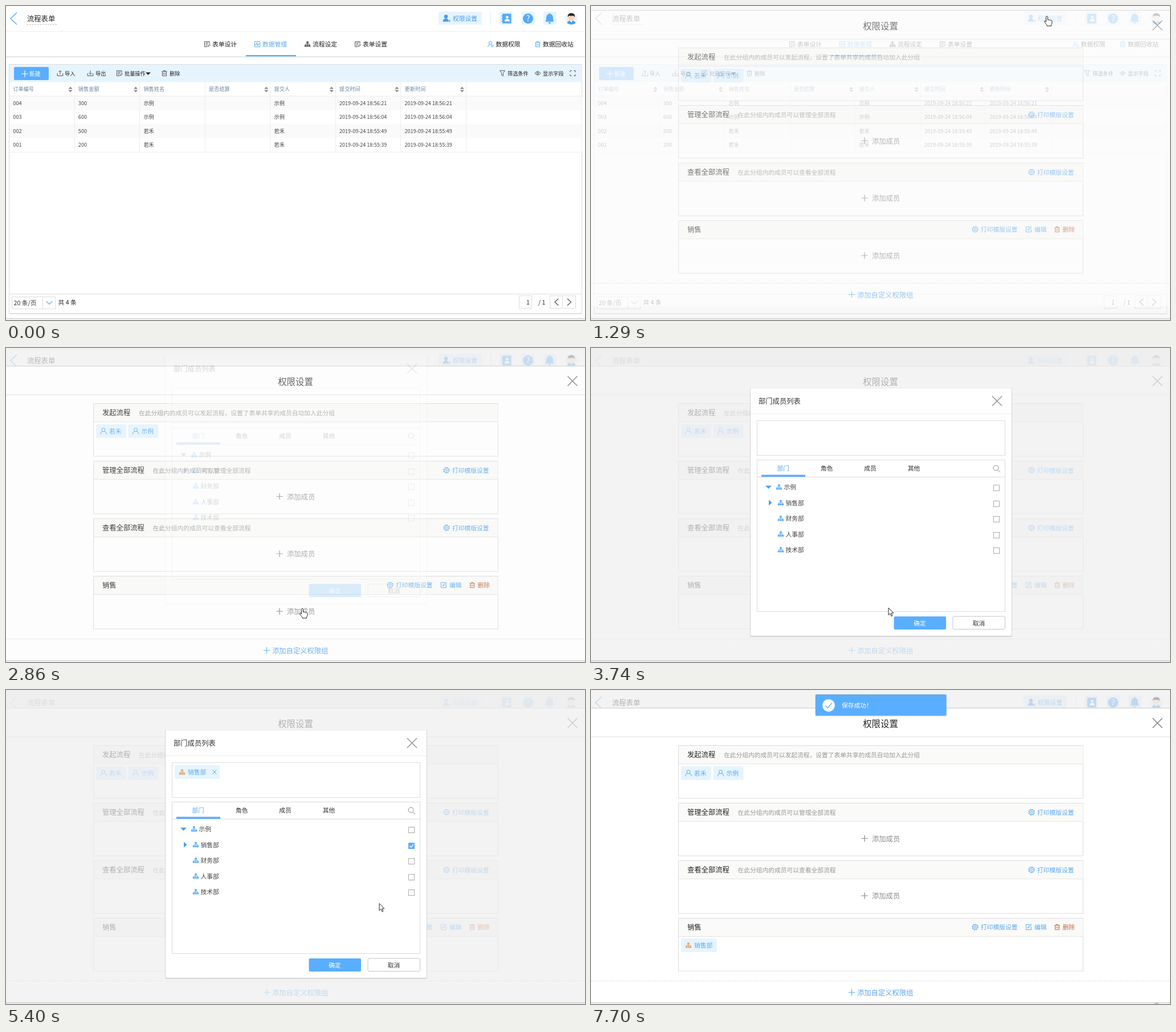
These frames come from a looping animation (1016x551 px, 7.78 s). An HTML page:

```html
<!DOCTYPE html>
<html>
<head>
<meta charset="utf-8">
<title>权限设置</title>
<style>
html, body { margin: 0; width: 100%; height: 100%; overflow: hidden; background: #fff; }
svg { display: block; width: 1016px; height: 551px; font-family: "Noto Sans CJK SC", "Noto Sans CJK", "Noto Sans", sans-serif; }
text { white-space: pre; }
.i { fill: none; stroke: currentColor; stroke-width: 1; }
</style>
</head>
<body>
<svg id="stage" viewBox="0 0 1016 551">
  <defs>
    <g id="user" class="i"><circle cy="-2.4" r="3"/><path d="M-5.4 5.4q.4-4.6 4-5.2M5.4 5.4q-.4-4.6-4-5.2"/></g>
    <g id="key" class="i"><circle cx="-.6" cy="-2" r="2.6"/><path d="M-5 5q.3-4 3.6-4.6"/><circle cx="3" cy="3" r="1.7"/></g>
    <g id="tree" fill="currentColor"><path d="M-1.8-4.8h3.6v3.2h-3.6zM-5.2 1.4h3.2v3h-3.2zM-1.6 1.4h3.2v3h-3.2zM2 1.4h3.2v3H2z"/><path class="i" d="M-3.6 1.6V0H3.6V1.6M0-2V2"/></g>
    <g id="gear" class="i"><circle r="4.1"/><circle r="1.8"/><circle r="5" stroke-dasharray="1.96" stroke-width="1.3"/></g>
    <g id="trash" class="i"><path d="M-4.6-3H4.6M-1.6-3V-4.6H1.6V-3M-3.5-3V4.6H3.5V-3M-1.2-.8V2.6M1.2-.8V2.6"/></g>
    <g id="edit" class="i"><path d="M1.5-4.4H-4.6V4.6H4.4V-.4M-1.6 1.8l.4-1.8L3.6-5l1.4 1.4L.2 1.4z"/></g>
    <g id="form" class="i"><path d="M4-1V-4.5H-4.5V4.5H0M-2.6-2.2H2.2M-2.6 0H1.2M-2.6 2.2H0M1.2 4.2l.3-1.6L4.2 0l1.2 1.2-2.6 2.6z"/></g>
    <g id="chart" class="i"><path d="M-4.6-4.6H4.6V4.6H-4.6zM-4 1h2L-.8-2.6 1 2.6 2.2-.4H4"/></g>
    <g id="in" class="i"><path d="M-4.8 0V4.5H4.8V0M0 2.2V-4.6M-2.6-2L0-4.6 2.6-2"/></g>
    <g id="out" class="i"><path d="M-4.8 0V4.5H4.8V0M0-4.6V2.2M-2.6-.4L0 2.2 2.6-.4"/></g>
    <g id="funnel" class="i"><path d="M-4.4-4.6H4.4L1.4-.4V4.8L-1.4 3.2V-.4z"/></g>
    <g id="eye" class="i"><path d="M-5 0Q0-6.4 5 0Q0 6.4-5 0z"/><circle r="1.6"/></g>
    <g id="full" class="i"><path d="M-4.5-1.8V-4.5H-1.8M1.8-4.5H4.5V-1.8M4.5 1.8V4.5H1.8M-1.8 4.5H-4.5V1.8"/></g>
    <g id="plus" class="i"><path stroke-width="1.2" d="M-5.8 0H5.8M0-5.8V5.8"/></g>
    <g id="cross" class="i"><path stroke-width="1.3" d="M-8.5-8.5L8.5 8.5M8.5-8.5L-8.5 8.5"/></g>
    <g id="sort" fill="#8b7f86"><path d="M-3.6-1L0-4.8 3.6-1zM-3.6 1L0 4.8 3.6 1z"/></g>
  </defs>
</svg>
<script>
const LOOP = 7780;
const BLUE = '#5aaeff', LINK = '#5aa8f5', PALE = '#e6f4ff', LINE = '#dcdcdc', DARK = '#333', GREY = '#999';
const S = 9.2, M = 10.75, L = 12.3;

const text = (x, y, size, str, fill = DARK, anchor = 'start') =>
  `<text x="${x}" y="${y + size * .37}" font-size="${size}" fill="${fill}" text-anchor="${anchor}">${str}</text>`;
const rect = (x, y, w, h, fill, more = '') =>
  `<rect x="${x}" y="${y}" width="${w}" height="${h}" fill="${fill}" ${more}/>`;
const frame = (x, y, w, h, stroke = LINE, more = '') =>
  rect(x + .5, y + .5, w, h, '#fff', `stroke="${stroke}" ${more}`);
const path = (d, stroke, width = 1, more = '') =>
  `<path d="${d}" fill="none" stroke="${stroke}" stroke-width="${width}" ${more}/>`;
const shape = (d, fill) => `<path d="${d}" fill="${fill}"/>`;
const disc = (x, y, r, fill) => `<circle cx="${x}" cy="${y}" r="${r}" fill="${fill}"/>`;
const icon = (id, x, y, color = '#555') => `<use href="#${id}" x="${x}" y="${y}" color="${color}"/>`;
const group = (id, ...parts) => `<g id="${id}">${parts.join('')}</g>`;

function topBar() {
  return path('M19 11.5L8 22L19 32.5', BLUE, 1.5) + text(37, 22, L, '流程表单', '#222')
    + path('M37 32.5H91', '#c8b9b4', 1, 'stroke-dasharray="2.5 2"')
    + rect(759, 10, 76, 23, PALE, 'rx="2"') + disc(772, 18.6, 3.3, '#4a9cea')
    + shape('M766.5 27.5q0-5.5 5.5-5.5q3 0 4 2v3.5z', '#4a9cea') + disc(778, 26, 2, '#7dbcf5')
    + text(784, 22, M, '权限设置', '#4a9cea') + path('M850.5 10V32', '#dcedf8')
    + [866, 904.5, 943].map(x => rect(x, 10, 23, 23, PALE, 'rx="2"')).join('')
    + rect(871, 13.5, 15.5, 17, '#55aaf6', 'rx="1"') + path('M869.5 17.5h3M869.5 22h3M869.5 26.5h3', '#55aaf6', 1.4)
    + disc(879.5, 19.5, 2.3, '#fff') + shape('M875 27q0-4.5 4.5-4.5t4.5 4.5z', '#fff')
    + disc(916, 22, 9, '#55aaf6') + text(916, 21.6, 14, '?', '#fff', 'middle')
    + shape('M946 27.5q2-1.8 2-6.5q0-6 4.8-6.9v-1.4h2.4v1.4q4.8.9 4.8 6.9q0 4.7 2 6.5zM951.5 28.5h5q-.6 2.6-2.5 2.6t-2.5-2.6z', '#55aaf6')
    + disc(992, 22, 11, '#e9f3fa') + shape('M984.5 30q1-4.5 7.5-4.5t7.5 4.5q-7 5-15 0z', '#4b9fe6')
    + shape('M989.5 25.5h5l-2.5 3.5z', '#fff') + disc(992, 20.5, 5.2, '#fbd5b5')
    + shape('M985.8 20q-.6-7.4 6.2-7.4t6.2 7.4q-1.2-2.8-3-3q-4.200.8-7 0q-1.800.8-2.4 3z', '#29262b')
    + path('M0 44.5H1016', '#eee');
}

function tabs() {
  const tab = (id, x, label, color = '#555', ink = '#222') => icon(id, x - 9, 67, color) + text(x, 67, M, label, ink);
  return tab('form', 362, '表单设计') + tab('chart', 450, '数据管理', LINK, LINK)
    + tab('tree', 538, '流程设定') + tab('form', 626, '表单设置')
    + tab('key', 859.5, '数据权限', LINK) + tab('trash', 942, '数据回收站', LINK)
    + group('hover', rect(843, 55, 62, 24, '#ededed', 'rx="2"'), tab('key', 859.5, '数据权限', LINK, LINK))
    + rect(0, 88, 1016, 1, '#dedede') + rect(0, 89, 1016, 2, '#f3f3f3') + rect(421, 86, 88, 2.4, BLUE);
}

function table() {
  const cols = ['订单编号', '销售金额', '销售姓名', '是否结算', '提交人', '提交时间', '更新时间'];
  const rows = [['004', 300, '示例', '56:21'], ['003', 600, '示例', '56:04'], ['002', 500, '若禾', '55:49'], ['001', 200, '若禾', '55:39']];
  const colX = i => 6 + i * 114.55;
  let out = rect(6, 103, 1005, 438, '#e4e4e4', 'rx="2"') + frame(5, 102, 1005, 437) + rect(6, 103, 1004.5, 30.5, PALE)
    + rect(14, 107, 61, 23, BLUE, 'rx="2"') + icon('plus', 33, 119, '#fff') + text(41, 119, 9.8, '新建', '#fff');
  const tools = [['in', 95, 103, '导入'], ['out', 148, 157, '导出'], ['form', 199, 208, '批量操作'], ['trash', 278, 287, '删除'],
    ['funnel', 871, 880, '筛选条件'], ['eye', 933, 942, '显示字段']];
  for (const [id, x, tx, label] of tools) out += icon(id, x, 118) + text(tx, 118.5, S, label, '#222');
  out += shape('M245 116.500h9l-4.500 4.500z', '#222') + icon('full', 994.5, 118);

  rows.forEach((r, i) => {
    const y = 158 + i * 24.4, date = `2019-09-24 18:${r[3]}`;
    out += rect(6, y, 1004.5, 24.4, i % 2 ? '#fff' : '#fafafa') + path(`M6 ${Math.round(y + 24.4) + .5}H1010`, '#ededed');
    [r[0], r[1], r[2], '', r[2], date, date].forEach((v, c) => {
      out += text(colX(c) + 6.3, y + 12.6, c > 4 ? 9 : S, v, '#444');
    });
  });
  cols.forEach((name, c) => {
    out += text(colX(c) + 6.3, 146, S, name, '#6b86a0') + path(`M${Math.round(colX(c + 1)) - .5} 133V255.500`, '#ededed');
    if (c !== 2) out += icon('sort', colX(c + 1) - 7.5, 146.5);
  });
  return out + path('M6 158H1010', '#ededed');
}

function pager() {
  return path('M6 505.500H1010', LINE) + frame(10, 510, 76, 21) + path('M64.500 510V531', LINE)
    + text(13.500, 521, M, '20 条/页') + path('M70.500 518L76 523.500L81.500 518', BLUE, 1.2) + text(91.500, 520, M, '共 4 条', '#222')
    + frame(900, 508, 22, 22) + text(916, 520, M, '1', DARK, 'middle') + text(934, 520, M, '/ 1')
    + frame(954, 508, 45, 22) + path('M976.500 508V531', LINE)
    + path('M969.500 513.500L963 519.500L969.500 525.500M985 513.500L991.500 519.500L985 525.500', '#555', 1.2);
}

const chip = (id, x, y, w, label, color = LINK) =>
  rect(x, y, w, 24, PALE, 'rx="2"') + icon(id, x + 13, y + 12, color) + text(x + 23, y + 12.5, M, label, LINK);

function panel() {
  const box = (y, title, noteX, note = '') => frame(153, y, 710, 92.5) + rect(154, y + 1, 709.5, 32, '#fafaf9')
    + path(`M154 ${y + 32.5}H863`, '#e4e4e4') + text(169, y + 16.500, L, title, '#222') + text(noteX, y + 17, M, note, GREY);
  const print = (x, y) => icon('gear', x, y, LINK) + text(x + 10, y + .5, M, '打印模版设置', LINK);
  const add = y => icon('plus', 480, y, '#888') + text(493, y + .5, L, '添加成员', '#8c8c8c');
  return rect(0, 31, 1016, 1.5, '#d6d6d6') + rect(0, 32.5, 1016, 518.5, '#fff')
    + text(508, 59, 15.4, '权限设置', '#222', 'middle') + icon('cross', 994, 58, '#777') + path('M0 82H1016', LINE)
    + box(97, '发起流程', 233, '在此分组内的成员可以发起流程，设置了表单共享的成员自动加入此分组')
    + chip('user', 158, 134, 53, '若禾') + chip('user', 214.5, 134, 53, '示例')
    + box(198, '管理全部流程', 257.5, '在此分组内的成员可以管理全部流程') + print(773, 214.5) + add(260.5)
    + box(299, '查看全部流程', 257.5, '在此分组内的成员可以查看全部流程') + print(773, 315.5) + add(361)
    + box(400, '销售', 0) + print(674, 416) + icon('edit', 768, 416, LINK) + text(778, 416.5, M, '编辑', LINK)
    + icon('trash', 818, 416, '#c4693c') + text(827.5, 416.5, M, '删除', '#c4693c')
    + group('empty', add(462)) + group('filled', chip('tree', 158, 436, 63, '销售部', '#e8a55c'))
    + path('M0 510.500H1016', LINE, 1, 'stroke-dasharray="2.500 1.500"')
    + icon('plus', 457.500, 530.500, BLUE) + text(467, 531, L, '添加自定义权限组', LINK);
}

function dialog() {
  let out = rect(279, 70, 460, 437, '#000', 'opacity=".12" rx="2"') + rect(280, 70.500, 458, 434.500, '#fff', 'rx="1"')
    + text(294, 93.500, L, '部门成员列表') + icon('cross', 712.500, 93, '#8d8d8d') + path('M280 115.500H738', '#ececec')
    + frame(291, 127, 435, 61) + frame(291, 196, 435, 266) + path('M291 226.500H726', LINE)
    + ['部门', '角色', '成员', '其他'].map((s, i) => text(326.500 + i * 76.400, 211.500, M, s, i ? DARK : LINK)).join('')
    + rect(299, 222.500, 77, 3.500, BLUE) + '<circle cx="710.500" cy="210.500" r="4.500" class="i" color="#888"/>' + path('M714 214L718 218', '#888')
    + group('row', rect(292, 258, 434, 27.500, PALE))
    + shape('M306 241.500h11l-5.500 5.500z', '#4a9fe6') + shape('M312 266.500v10l5.500-5z', '#4a9fe6');
  ['示例', '销售部', '财务部', '人事部', '技术部'].forEach((s, i) => {
    const y = 244 + i * 27.500, x = i ? 333 : 330;
    out += icon('tree', x, y, BLUE) + text(x + 8.500, y + .500, M, s, '#444') + frame(706, Math.round(y - 4), 10, 10, '#aaa');
  });
  const cross = path('M362.500 140.500l7 7M369.500 140.500l-7 7', LINK);
  return out
    + group('picked', rect(706, 268, 11, 11, BLUE), path('M708.500 273.500l2.500 2.500l4-5', '#fff', 1.300), chip('tree', 296, 132, 79, '销售部', '#e8a55c'), cross)
    + rect(531.500, 471, 91.500, 23, BLUE, 'rx="2"') + text(577, 483, M, '确定', '#fff', 'middle')
    + frame(634.500, 470.500, 91.500, 22.500, '#c4c4c4', 'rx="2"') + text(680.500, 483, M, '取消', DARK, 'middle');
}

const veil = id => group(id, rect(0, 0, 1016, 551, '#eee', 'fill-opacity=".7"'));
const toast = rect(393, 7, 231.500, 39.500, '#000', 'opacity=".12" rx="3"') + rect(394, 8, 229.500, 37, BLUE, 'rx="2"')
  + disc(417, 27, 10.800, '#fff') + path('M411.500 27.500l4 4l7-8.500', BLUE, 1.300) + text(440, 27, M, '保存成功！', '#fff');
const arrow = '<path d="M0 0V12.500L2.900 9.800L5 14.600L6.900 13.800L4.900 9.100H8.800Z" fill="#fff" stroke="#222"/>';
const hand = '<path d="M-1.500 10V1.500a1.400 1.400 0 0 1 2.900 0V6.500q1.400-1 2.700.3q1.500-.8 2.600.4q1.600-.5 2.200 1V11.500q0 2.300-1.400 3.600V17H0V15.500Q-2 13-4.600 9.600q-.2-1.800 1.500-1.400z" fill="#fff" stroke="#222"/>';

document.getElementById('stage').innerHTML += topBar() + tabs() + table() + pager()
  + veil('veil1') + group('panel', panel()) + veil('veil2') + group('dialog', dialog()) + group('toast', toast)
  + rect(0, 548, 1016, 1.500, '#cfcfcf') + group('dot', disc(992.500, 554, 5, '#f3a648'))
  + group('cursor', group('arrow', arrow), group('hand', hand));

// Keys are [ms, declarations, easing]; values hold unless an easing is given.
const sheet = document.head.appendChild(document.createElement('style'));
let css = '';
function anim(id, keys) {
  const rows = [...keys, [LOOP, keys[keys.length - 1][1]]];
  css += `#${id}{animation:${id} ${LOOP}ms infinite}@keyframes ${id}{`
    + rows.map(([t, decl, ease = 'step-end']) => `${t / LOOP * 100}%{${decl};animation-timing-function:${ease}}`).join('') + '}';
}
const hops = n => `steps(${n - 1},jump-both)`;
const show = on => `opacity:${on ? 1 : 0}`;
const toggle = (id, start, ...times) => anim(id, [[0, show(start)], ...times.map((t, i) => [t, show(i % 2 ? start : !start)])]);
const at = (x, y) => `transform:translate(${x}px,${y}px)`;
const lift = (on, y) => `${show(on)};${at(0, y)}`;

toggle('hover', 0, 810, 880);
anim('veil1', [[0, show(0)], [1110, show(0), hops(5)], [1430, show(1)]]);
anim('panel', [[0, lift(0, -60)], [1110, lift(0, -60), hops(5)], [1430, lift(1, 0)]]);
anim('veil2', [[0, show(0)], [2860, show(0), hops(5)], [3180, show(1)], [5880, show(1), hops(4)], [6126, show(0)]]);
anim('dialog', [[0, lift(0, -71)], [2860, lift(0, -71), hops(5)], [3180, lift(1, 0)], [5880, lift(1, 0), hops(6)], [6290, lift(0, -71)]]);
anim('toast', [[0, show(0)], [6290, show(0), hops(3)], [6450, show(1)]]);
toggle('picked', 0, 4850);
toggle('filled', 0, 5880);
toggle('empty', 1, 5880);
toggle('dot', 0, 7700);

const row = i => lift(1, i * 27.500);
anim('row', [[0, lift(0, 0)], [4214, row(3)], [4372, row(2)], [4530, row(1)], [4690, row(0)],
  [5010, row(1)], [5089, row(2)], [5247, row(3)], [5326, lift(0, 0)]]);

const handTimes = [810, 880, 960, 1430, 2460, 2940, 4214, 5326, 5720, 5960];
toggle('hand', 0, ...handTimes);
toggle('arrow', 1, ...handTimes);

// Each move: start, end, number of hops, destination.
let pos = at(992, 562);
const track = [[0, pos]];
for (const [t0, t1, n, x, y] of [
  [70, 810, 10, 896, 58], [880, 960, 2, 800, 18], [1660, 1900, 4, 628, 234], [1980, 2380, 6, 540, 430],
  [2460, 2700, 4, 520, 457], [3740, 3740, 1, 522, 456], [3820, 4450, 9, 660, 320], [4530, 4690, 3, 703, 271],
  [4770, 4850, 2, 710, 272], [5010, 5720, 10, 600, 477], [5800, 5800, 1, 598, 475], [6740, 7060, 5, 992, 562]
]) {
  if (n > 1) track.push([t0, pos, hops(n)]);
  track.push([t1, pos = at(x, y)]);
}
anim('cursor', track);
sheet.textContent = css;
</script>
</body>
</html>
```
